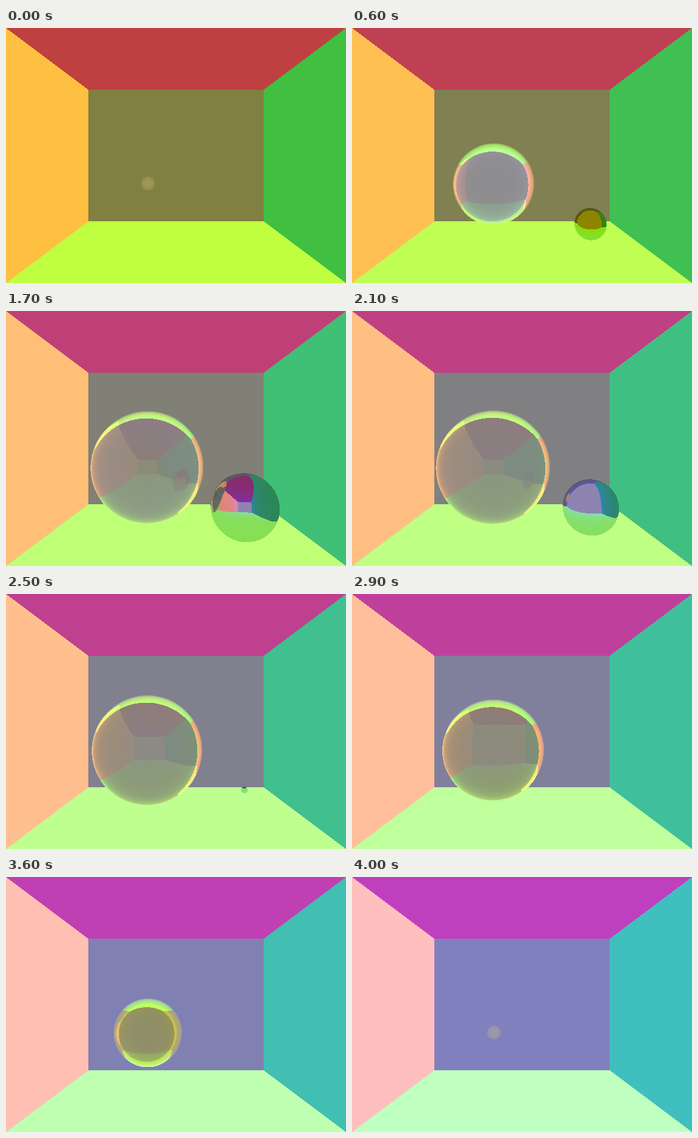
Animation, 512 px wide and 384 px high, one loop 4.1 s. Source, as an HTML page with a canvas:

```html
<!DOCTYPE html>
<html lang="en">
<head>
<meta charset="utf-8">
<title>Slices of a four-dimensional room</title>
<style>
  html, body { margin: 0; width: 100%; height: 100%; overflow: hidden; background: #808040; }
  canvas { display: block; width: 512px; height: 384px; }
</style>
</head>
<body>
<canvas id="stage" width="512" height="384"></canvas>
<script>
// A 4D ray tracer: the camera drifts along w past a glass and a mirror hypersphere.
const W = 512, H = 384, STEP = 100, STEPS = 41;
const FOCAL = H / 2 / Math.tan(Math.PI / 8);
const CAM_Z = 5, W_RANGE = 0.991;
const INDEX = 1.9, MIRROR = 0.7, EPS = 1e-5;

const balls = [
  { x: -0.5, y: -0.5, z: -0.5, w: 0, r: 1, glass: true },
  { x: 1, y: -1, z: 0.5, w: -0.25, r: 0.5, glass: false }
];

// Red and green of each wall; blue follows the w coordinate.
const LEFT = [1.25, 0.75], RIGHT = [0.25, 0.75];
const FLOOR = [0.75, 1.25], CEILING = [0.75, 0.25];
const BACK = [0.5, 0.5], FRONT = [0.75, 0.75], SIDE_W = [0.79, 0.74];

let red, green, blue;

function hitWall(px, py, pz, pw, dx, dy, dz, dw, k) {
  let t = Infinity, wall = BACK, s;
  if (dx) { s = ((dx < 0 ? -2 : 2) - px) / dx; if (s < t) { t = s; wall = dx < 0 ? LEFT : RIGHT; } }
  if (dy) { s = ((dy < 0 ? -1.5 : 1.5) - py) / dy; if (s < t) { t = s; wall = dy < 0 ? FLOOR : CEILING; } }
  if (dz) { s = ((dz < 0 ? -2 : 6) - pz) / dz; if (s < t) { t = s; wall = dz < 0 ? BACK : FRONT; } }
  if (dw) { s = ((dw < 0 ? -2 : 2) - pw) / dw; if (s < t) { t = s; wall = SIDE_W; } }
  red += k * wall[0];
  green += k * wall[1];
  blue += k * (0.5 + 0.25 * (pw + t * dw));
}

function fresnel(c1, c2, n) {
  const s = (c1 - n * c2) / (c1 + n * c2);
  const p = (n * c1 - c2) / (n * c1 + c2);
  return (s * s + p * p) / 2;
}

function trace(px, py, pz, pw, dx, dy, dz, dw, k, depth) {
  if (k < 0.003 || depth > 10) return;
  let t = Infinity, ball = null;
  for (const b of balls) {
    const ox = px - b.x, oy = py - b.y, oz = pz - b.z, ow = pw - b.w;
    const half = ox * dx + oy * dy + oz * dz + ow * dw;
    const disc = half * half - (ox * ox + oy * oy + oz * oz + ow * ow - b.r * b.r);
    if (disc <= 0) continue;
    const root = Math.sqrt(disc);
    let s = -half - root;
    if (s < EPS) s = -half + root;
    if (s > EPS && s < t) { t = s; ball = b; }
  }
  if (!ball) return hitWall(px, py, pz, pw, dx, dy, dz, dw, k);

  px += t * dx; py += t * dy; pz += t * dz; pw += t * dw;
  let nx = (px - ball.x) / ball.r, ny = (py - ball.y) / ball.r;
  let nz = (pz - ball.z) / ball.r, nw = (pw - ball.w) / ball.r;
  let c1 = -(nx * dx + ny * dy + nz * dz + nw * dw);
  const inside = c1 < 0;
  if (inside) { nx = -nx; ny = -ny; nz = -nz; nw = -nw; c1 = -c1; }

  let mirrored = MIRROR;
  if (ball.glass) {
    const n = inside ? 1 / INDEX : INDEX;
    const c2sq = 1 - (1 - c1 * c1) / (n * n);
    mirrored = 1;
    if (c2sq > 0) {
      const c2 = Math.sqrt(c2sq), e = 1 / n, m = e * c1 - c2;
      mirrored = fresnel(c1, c2, n);
      trace(px, py, pz, pw, e * dx + m * nx, e * dy + m * ny, e * dz + m * nz, e * dw + m * nw,
        k * (1 - mirrored), depth + 1);
    }
  }
  const m = 2 * c1;
  trace(px, py, pz, pw, dx + m * nx, dy + m * ny, dz + m * nz, dw + m * nw, k * mirrored, depth + 1);
}

const ctx = document.getElementById("stage").getContext("2d");
const cache = [];

function render(step) {
  const image = ctx.createImageData(W, H), data = image.data;
  const w = W_RANGE * (2 * step / (STEPS - 1) - 1);
  let o = 0;
  for (let j = 0; j < H; j++) {
    for (let i = 0; i < W; i++) {
      const x = i + 0.5 - W / 2, y = H / 2 - j - 0.5;
      const len = Math.sqrt(x * x + y * y + FOCAL * FOCAL);
      red = green = blue = 0;
      trace(0, 0, CAM_Z, w, x / len, y / len, -FOCAL / len, 0, 1, 0);
      data[o++] = red * 255;
      data[o++] = green * 255;
      data[o++] = blue * 255;
      data[o++] = 255;
    }
  }
  return image;
}

let shown = -1;
function draw(now) {
  const step = Math.floor(now / STEP) % STEPS;
  if (step !== shown) {
    cache[step] = cache[step] || render(step);
    ctx.putImageData(cache[step], 0, 0);
    shown = step;
  }
}

let start = null;
function tick(now) {
  if (start === null) start = now;
  draw(Math.max(0, now - start));
  requestAnimationFrame(tick);
}
draw(0);
requestAnimationFrame(tick);
</script>
</body>
</html>
```
